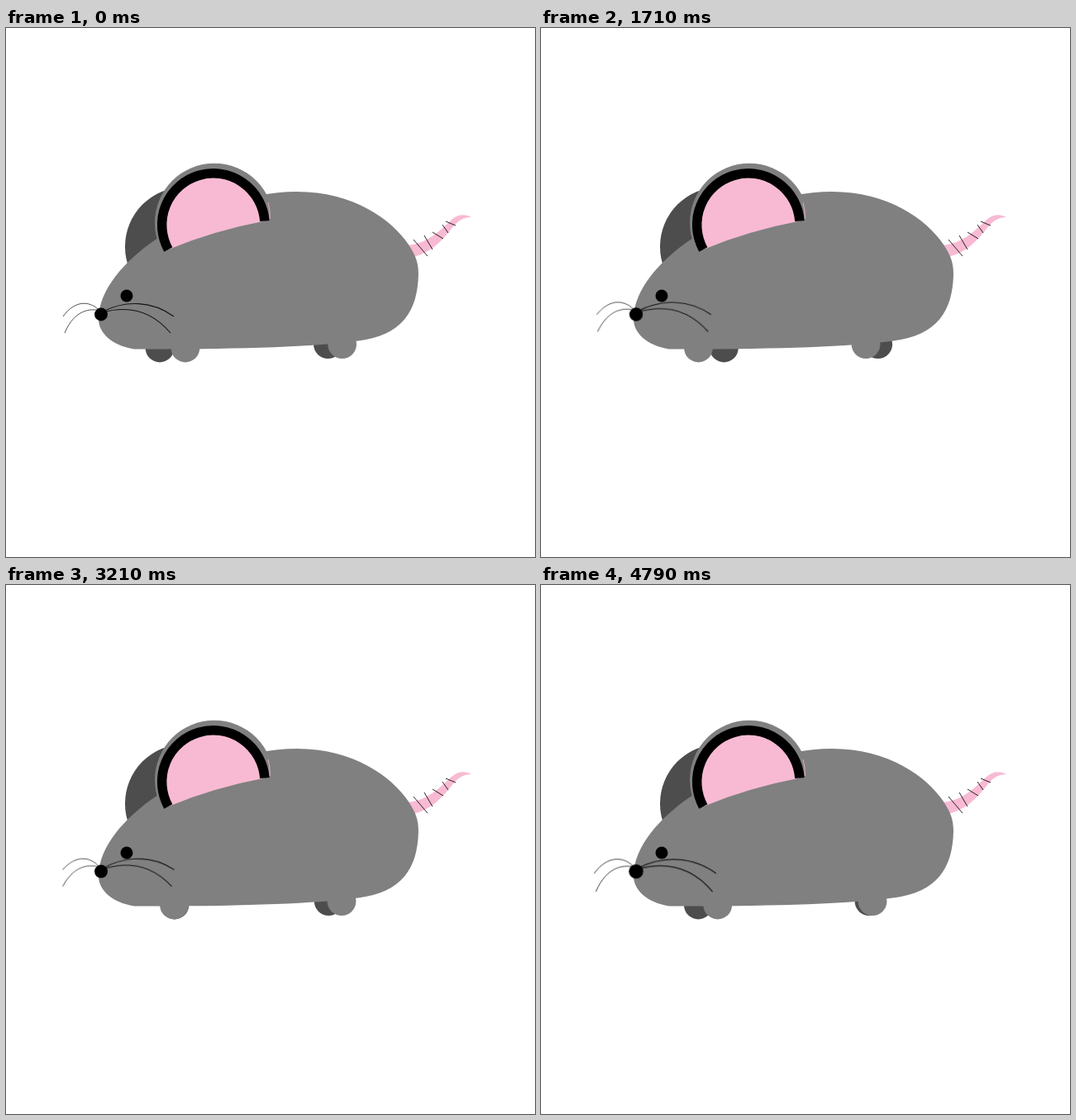
An HTML page without scripts for the animation above (4.87 s loop, 640x640 px).

```html
<!DOCTYPE html>
<html lang="en">
<head>
<meta charset="utf-8">
<title>Mouse</title>
<style>
  /* Clock in milliseconds that drives all periodic motion. */
  @property --t { syntax: '<number>'; inherits: true; initial-value: 0; }
  @keyframes clock { to { --t: 4870; } }

  html, body { margin: 0; width: 100%; height: 100%; overflow: hidden; background: #fff; }
  svg { display: block; width: 100%; height: 100%; animation: clock 4.87s linear infinite; }

  .grey { fill: #808080; }
  .dark { fill: #4d4d4d; }
  .pink { fill: #f8bad3; }
  .line { fill: none; stroke: #000; stroke-opacity: .85; }

  /* Triangle wave: the first two harmonics are enough. */
  .foot {
    --phase: (pi * (var(--t) / 338 + var(--lead)));
    transform: translateX(calc(var(--swing) * (.5 - .45 * cos(var(--phase)) - .05 * cos(3 * var(--phase)))));
  }
  .front { --lead: 0; }
  .back { --lead: .24; }
  .near { --swing: -27px; }
  .far { --swing: 36px; }

  /* Nose and whiskers start to pulse after a short rest. */
  .sniff {
    transform-origin: 115px 346.5px;
    transform: scale(calc(1 + .07 * (1 - cos(pi * max(0, var(--t) - 580) / 147))));
  }

  .move { animation: 4.87s linear infinite; }
  .tail { animation-name: wag; transform-origin: 485px 267px; }
  .ear { animation-name: twitch; }
  .eye { animation-name: dip; --x: -8px; --y: 3px; }
  .lid { animation-name: blink; transform-origin: 146px 324px; }
  .nose { animation-name: dip; --x: 0px; --y: 8.5px; }
  .whisker { animation-name: lift; transform-origin: 115px 343px; }

  @keyframes wag {
    0%, 31%, 100% { transform: rotate(0); }
    5% { transform: rotate(-13deg); }
    11% { transform: rotate(8deg); }
    22% { transform: rotate(-13deg); }
  }
  @keyframes twitch {
    0%, 14%, 22%, 100% { transform: translateY(0); }
    18% { transform: translateY(-10.5px); }
  }
  @keyframes dip {
    0%, 6%, 33%, 100% { transform: translate(0, 0); }
    24% { transform: translate(var(--x), var(--y)); }
  }
  @keyframes blink {
    0%, 56%, 62%, 100% { transform: scaleY(1); }
    59% { transform: scaleY(.1); }
  }
  @keyframes lift {
    0%, 24%, 100% { transform: rotate(0); }
    54% { transform: rotate(var(--lift)); }
  }
</style>
</head>
<body>
<svg viewBox="0 0 640 640">
  <g class="move tail">
    <path class="pink" d="M484 263C510 262 528 242 539 232C547 225 556 225 563 229C552 229 545 235 539 243C526 259 514 272 492 277Z"/>
    <path class="line" d="M493 256L510 276M506 251L516 268M516 247L529 255M528 238L535 248M532 234L544 239"/>
  </g>

  <circle class="dark" cx="216" cy="264.5" r="72"/>
  <circle class="dark foot front far" cx="186" cy="387" r="17.4"/>
  <circle class="dark foot back far" cx="382" cy="382.7" r="17.4"/>

  <path class="grey" d="M155 388.5C128 384 112 369 112 352C112 317 144 281 181 256C225 225 290 198 352 198C420 198 467 232 487 262C496 276 499 284 499 298C498 343 479 372 426 378.5C372 386 270 389 155 388.5Z"/>
  <circle class="grey foot front near" cx="217" cy="387" r="17.4"/>
  <circle class="grey foot back near" cx="412.3" cy="382.7" r="17.4"/>

  <g class="move ear">
    <circle class="grey" cx="252" cy="235.7" r="72"/>
    <path d="M317 211Q319.5 219 319.5 231" fill="none" stroke="#f8bad3" stroke-width=".8"/>
    <path class="pink" d="M196.3 267.9A62.2 62.2 0 1 1 312.9 233.5Q252 245 196.3 267.9Z"/>
    <path d="M196.3 267.9A62.2 62.2 0 1 1 312.9 233.5" fill="none" stroke="#000" stroke-width="11.5"/>
  </g>

  <g class="move eye"><circle class="move lid" cx="146" cy="324" r="7.5"/></g>

  <g class="move nose">
    <g class="sniff">
      <path class="line move whisker" style="--lift: 7.4deg" stroke-width=".8" d="M114 343C103 330 84 328 69 349M114 342C103 339 83 340 71 369"/>
      <path class="line move whisker" style="--lift: -4deg" stroke-width="1.1" d="M117 343C145 329 177 330 203 349M117 344C150 335 178 344 199 369"/>
      <circle cx="115" cy="346.5" r="7.9"/>
    </g>
  </g>
</svg>
</body>
</html>
```
